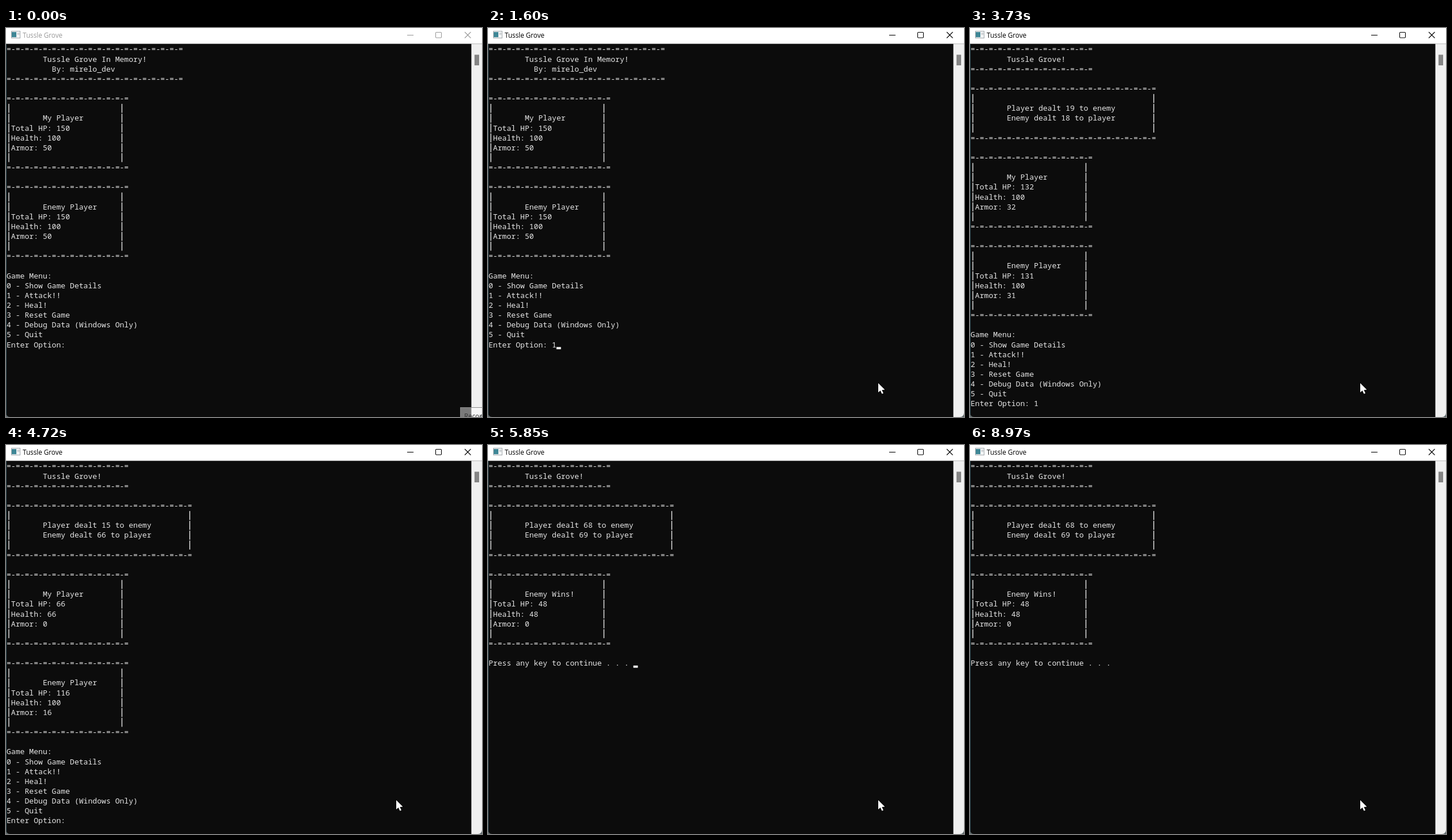
These frames come from a looping animation (827 px wide and 677 px high, 9300 ms). An HTML page with a canvas:

```html
<!DOCTYPE html>
<html lang="en">
<head>
<meta charset="utf-8">
<title>Tussle Grove</title>
<style>
  html, body { margin: 0; width: 100%; height: 100%; overflow: hidden; background: #0c0c0c; }
  canvas { display: block; }
</style>
</head>
<body>
<canvas id="stage" width="827" height="677"></canvas>
<script>
const ctx = document.getElementById('stage').getContext('2d');
const LOOP = 9300, W = 827, H = 677;
const CELL = 7.86, ROW = 17.14;
const NAME = 'Tussle Grove';
const TAB = ' '.repeat(8);
const MONO = '13.1px "Noto Sans Mono", "DejaVu Sans Mono", monospace';
const UI = '11.7px "Open Sans", "Noto Sans", sans-serif';

// Screen text; side is the column of the right-hand border
const bar = n => '=-'.repeat(n).slice(0, n);
const boxed = (lines, width, side) =>
  [bar(width), ...['', ...lines, ''].map(s => '|' + s.padEnd(side - 1) + '|'), bar(width)];
const card = (title, total, health, armor) => boxed(
  [' '.repeat(7) + title, 'Total HP: ' + total, 'Health: ' + health, 'Armor: ' + armor], 27, 25);
const menu = ['', 'Game Menu:', '0 - Show Game Details', '1 - Attack!!', '2 - Heal!',
  '3 - Reset Game', '4 - Debug Data (Windows Only)', '5 - Quit', 'Enter Option: '];
const head = [bar(27), TAB + NAME + '!', bar(27), ''];
const report = (mine, theirs) => boxed([
  ' '.repeat(7) + `Player dealt ${mine} to enemy`,
  ' '.repeat(7) + `Enemy dealt ${theirs} to player`], 41, 40);
const round = (hits, me, enemy) => [...head, ...report(...hits), '',
  ...card('My Player', ...me), '', ...card('Enemy Player', ...enemy), ...menu];

const intro = [bar(39), TAB + NAME + ' In Memory!', TAB + '  By: mirelo_dev', bar(39), '',
  ...card('My Player', 150, 100, 50), '', ...card('Enemy Player', 150, 100, 50), ...menu];
const first = round([19, 18], [132, 100, 32], [131, 100, 31]);
const second = round([15, 66], [66, 66, 0], [116, 100, 16]);
const redraw = [head[1], ...second.slice(1)];
const last = [...head, ...report(68, 69), '', ...card('Enemy Wins!', 48, 48, 0), '',
  'Press any key to continue . . . '];

// start, screen, typed input, caret visible
const timeline = [
  [0, intro, '', false], [540, intro, '', true], [940, intro, '1', true],
  [1070, intro, '1', false], [1600, intro, '1', true],
  [1660, first, '', true], [2670, first, '', false], [3190, first, '', true],
  [3270, first, '1', true], [3730, first, '1', false],
  [3860, second, '', true], [4720, second, '', false], [5250, second, '', true],
  [5310, second, '1', true], [5780, redraw, '1', false],
  [5850, last, '', true], [6840, last, '', false], [7370, last, '', true],
  [7910, last, '', false], [8440, last, '', true], [8970, last, '', false]
];

function rect(color, x, y, w, h) {
  ctx.fillStyle = color;
  ctx.fillRect(x, y, w, h);
}

function path(points, close) {
  ctx.beginPath();
  points.forEach(([x, y], i) => i ? ctx.lineTo(x, y) : ctx.moveTo(x, y));
  if (close) ctx.closePath();
}

function drawFrame(active) {
  rect('#0c0c0c', 0, 0, W, H);
  rect('#fff', 0, 0, W, 27.5);
  rect('#f0f0f0', 808.5, 27.5, 18.5, H - 27.5);
  rect('#858585', 814, 46.5, 8, 18.5);
  rect('#35525a', 0, 28, 1, H - 28);

  // Rounded lower corners
  ctx.fillStyle = '#5f6a6c';
  ctx.beginPath();
  ctx.moveTo(0, 670); ctx.quadraticCurveTo(0.5, 676.5, 7, 677); ctx.lineTo(0, 677);
  ctx.moveTo(827, 670); ctx.quadraticCurveTo(826.5, 676.5, 820, 677); ctx.lineTo(827, 677);
  ctx.fill();

  // Window icon
  rect('#a3a9ad', 9, 5, 16, 13);
  rect('#f4f5f6', 10, 6, 14, 11);
  rect('#3f8796', 10, 7, 8, 9);
  rect('#b4b9bc', 20, 8, 1, 4);
  rect('#b4b9bc', 22, 8, 1, 4);

  const ink = active ? '#000' : '#999';
  ctx.font = UI;
  ctx.fillStyle = ink;
  ctx.fillText(NAME, 29, 17);
  ctx.strokeStyle = ink;
  ctx.lineWidth = 1.1;
  path([[697, 12.5], [708, 12.5]]);
  ctx.stroke();
  ctx.beginPath();
  ctx.roundRect(746.5, 7.5, 10, 9.5, 1.2);
  ctx.stroke();
  path([[797, 7], [807.5, 17.5]]);
  ctx.stroke();
  path([[807.5, 7], [797, 17.5]]);
  ctx.stroke();
}

function drawText(lines, input, caret) {
  ctx.font = MONO;
  ctx.textAlign = 'center';
  const end = lines.length - 1;
  lines.forEach((line, row) => {
    const mid = 37 + row * ROW;
    const text = row === end ? line + input : line;
    ctx.fillStyle = '#e6e6e6';
    [...text].forEach((ch, col) => {
      const x = 1 + (col + 0.5) * CELL;
      if (ch === '|') ctx.fillRect(x - 0.7, mid - 7.8, 1.4, 15.6);
      else if (ch !== ' ') ctx.fillText(ch, x, mid + 4.4);
    });
    if (row === end && caret) rect('#f2f2f2', 1 + text.length * CELL, mid + 4, CELL, 3.9);
  });
  ctx.textAlign = 'left';
}

function drawTip(alpha) {
  ctx.globalAlpha = alpha;
  rect('rgba(255,255,255,0.45)', 789, 660, 38, 17);
  ctx.strokeStyle = '#8a8a8a';
  ctx.lineWidth = 1;
  ctx.strokeRect(789.5, 660.5, 40, 20);
  ctx.font = UI;
  ctx.fillStyle = '#333';
  ctx.fillText('Record', 796, 680);
  ctx.globalAlpha = 1;
}

function drawPointer(x, y) {
  path([[0, 0], [0, 16.3], [3.7, 12.9], [6.4, 18.8], [9, 17.7], [6.4, 11.9], [11.5, 11.6]]
    .map(([a, b]) => [x + a, y + b]), true);
  ctx.strokeStyle = '#000';
  ctx.lineWidth = 1.4;
  ctx.stroke();
  ctx.fillStyle = '#fff';
  ctx.fill();
}

function draw(t) {
  const [, lines, input, caret] = timeline.findLast(s => s[0] <= t);
  drawFrame(t >= 540);
  drawText(lines, input, caret);
  if (t < 200) drawTip(t < 70 ? 1 : t < 130 ? 0.6 : 0.25);
  if (t >= 70) {
    // The pointer glides in from the lower right corner, in coarse steps
    const p = Math.min(1, (Math.floor((t - 70) / 67) + 1) / 6);
    const left = (1 - p) ** 2;
    drawPointer(678 + 149 * left, 618 + 59 * left);
  }
}

const start = performance.now();
function tick() {
  draw((performance.now() - start) % LOOP);
  requestAnimationFrame(tick);
}
tick();
</script>
</body>
</html>
```
